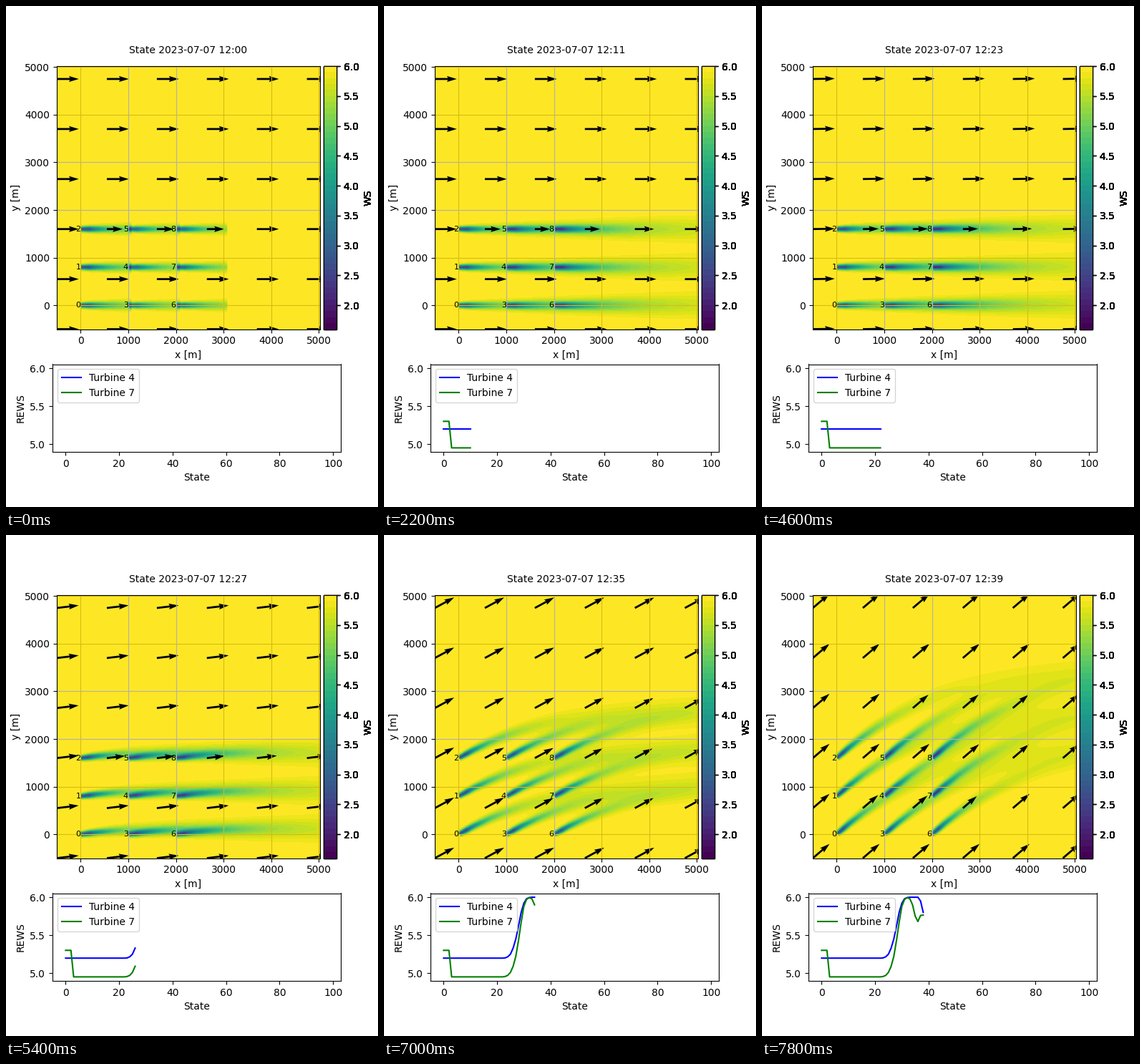
Animation of 520 by 700 pixels, one loop 8 s. Source, as a matplotlib script:

```python
import numpy as np
import matplotlib.pyplot as plt
from matplotlib.animation import FuncAnimation
from matplotlib.cm import ScalarMappable
from matplotlib.colors import BoundaryNorm

W, H = 520, 700
N = 40                      # states in one loop, one minute each
WS, STEP = 6.0, 360.0       # free wind speed and drift per minute
DIAM, CT, GROWTH, EPS = 126.0, 0.8, 0.0385, 0.285
LEVELS = np.linspace(1.6, 6.0, 45)
NORM = BoundaryNorm(LEVELS, 256)
TURBINES = [(x, y) for x in (0, 1000, 2000) for y in (0, 800, 1600)]

plt.rcParams["font.family"] = "DejaVu Sans"

# rotor speeds of the second and third turbine column
MID = np.array([5.197] * 23 + [5.2, 5.215, 5.25, 5.33, 5.45, 5.62, 5.8, 5.92,
                               5.98, 5.995, 6, 6, 6, 6, 5.95, 5.8, 5.65])
LAST = np.array([5.3] * 3 + [4.95] * 20
                + [4.955, 4.97, 5.01, 5.09, 5.22, 5.43, 5.67, 5.88, 5.97,
                   5.995, 5.98, 5.9, 5.75, 5.68, 5.76, 5.765, 5.77])

grid = np.arange(-500, 5021, 30.0)
X, Y = np.meshgrid(grid, grid)
SPARSE = (slice(None, None, 35),) * 2


def wind_angle(n):
    p = np.clip((n - 20.5) / 29, 0, 1)
    return np.radians(57) * (1 - np.cos(np.pi * p)) / 2


def wake(x0, y0, n):
    """Relative wind deficit behind one turbine along its bent wake."""
    best = np.full(X.shape, np.inf)
    dist = np.zeros(X.shape)
    px, py = x0, y0
    count = min(n + 3, 18)
    for k in range(count):
        a = wind_angle(n - k)
        c, s = np.cos(a), np.sin(a)
        along = (X - px) * c + (Y - py) * s
        across = (Y - py) * c - (X - px) * s
        t = np.clip(along, 0, STEP)
        d2 = across**2 + (along - t) ** 2
        if k == 0:
            d2[along < 0] = np.inf
        if k == count - 1:
            d2[along > STEP] = np.inf
        near = d2 < best
        best[near] = d2[near]
        dist[near] = k * STEP + t[near]
        px, py = px + STEP * c, py + STEP * s
    sigma = EPS * DIAM + GROWTH * dist
    peak = 1 - np.sqrt(np.maximum(0.15, 1 - CT / (8 * (sigma / DIAM) ** 2)))
    return peak * np.exp(-best / (2 * sigma**2))


def wind_field(n):
    speed = {0: WS, 1000: MID[n], 2000: LAST[n]}
    u = WS - sum(speed[x] * wake(x, y, n) for x, y in TURBINES)
    return np.clip(u, LEVELS[0], WS)


def add_axes(left, top, width, height):
    return fig.add_axes([left / W, 1 - (top + height) / H, width / W, height / H])


fig = plt.figure(figsize=(W / 100, H / 100), dpi=100)

ax = add_axes(71.06, 84, 367.5, 367.5)
ax.set(xlim=(-500, 5020), ylim=(-500, 5020), xlabel="x [m]", ylabel="y [m]",
       xticks=range(0, 5001, 1000), yticks=range(0, 5001, 1000))
for v in range(0, 5001, 1000):
    ax.axvline(v, lw=0.8, zorder=1.5,
               color="#b0b0b0" if v in (1000, 2000) else "#d8bc10")
    ax.axhline(v, lw=0.8, zorder=1.5,
               color="#b0b0b0" if v in (2000, 3000) else "#d8bc10")
for i, (x, y) in enumerate(TURBINES):
    ax.text(x, y, str(i), size=8, ha="right", va="center")
title = fig.text(254.6 / W, 1 - 61.5 / H, "", ha="center", va="center")

# stacked copies give the colour bar its heavy lines and text
for _ in range(8):
    cax = add_axes(443.56, 84, 18.375, 367.5)
    bar = fig.colorbar(ScalarMappable(NORM, "viridis"), cax=cax, label="WS",
                       ticks=np.arange(2, 6.1, 0.5), format="%.1f",
                       spacing="proportional")
    bar.minorticks_off()

QX, QY = X[SPARSE], Y[SPARSE]
arrows = ax.quiver(QX, QY, np.full(QX.shape, WS), np.zeros(QX.shape), color="k",
                   angles="xy", scale_units="xy", scale=0.013)

chart = add_axes(65, 500.5, 403, 122.5)
chart.set(xlim=(-4.9, 102.9), ylim=(4.897, 6.053), xlabel="State", ylabel="REWS",
          xticks=range(0, 101, 20), yticks=(5, 5.5, 6))
lines = [chart.plot([], [], color=c, label=f"Turbine {i}")[0]
         for c, i in (("blue", 4), ("green", 7))]
chart.legend(loc="upper left")

filled = []


def draw(n):
    while filled:
        filled.pop().remove()
    u = wind_field(n)
    filled.append(ax.contourf(X, Y, u, LEVELS, cmap="viridis", norm=NORM, zorder=0))
    a = wind_angle(n)
    arrows.set_UVC(u[SPARSE] * np.cos(a), u[SPARSE] * np.sin(a))
    title.set_text(f"State 2023-07-07 12:{n:02d}")
    for line, values in zip(lines, (MID, LAST)):
        line.set_data(np.arange(n), values[:n])
    return []


anim = FuncAnimation(fig, draw, frames=N, init_func=lambda: [], interval=200, repeat=True)
plt.show()
```
